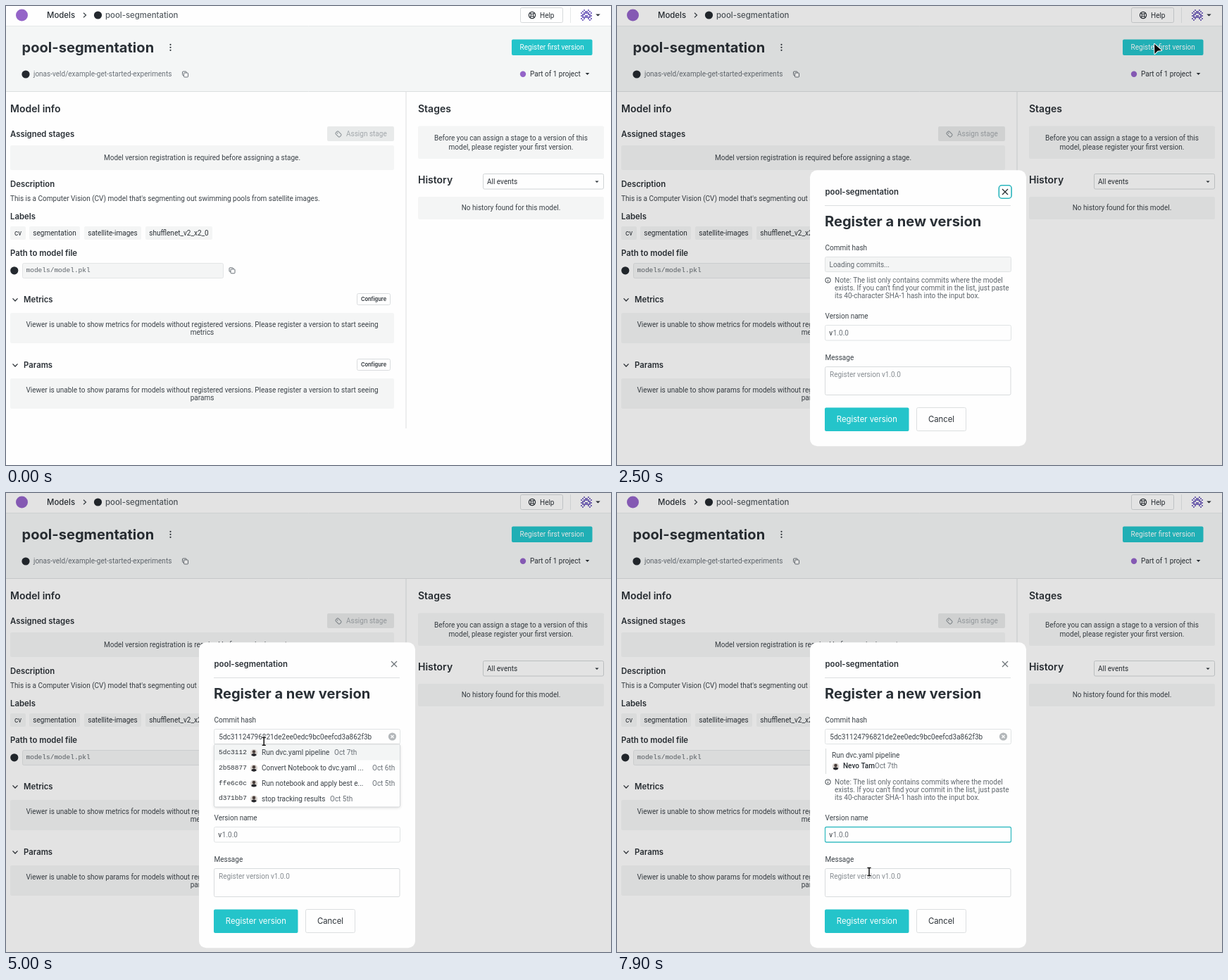
Write an HTML page with a canvas that moves like this. It is 859 px wide and 652 px high and loops after 8000 ms.

```html
<!DOCTYPE html>
<html lang="en">
<head>
<meta charset="utf-8">
<title>Register a model version</title>
<style>
  html, body { margin: 0; width: 100%; height: 100%; overflow: hidden; background: #fefefe; }
  canvas { display: block; width: 859px; height: 652px; }
</style>
</head>
<body>
<canvas id="stage"></canvas>
<script>
const W = 859, H = 652, LOOP = 8000, STEP = 100;
const canvas = document.getElementById('stage');
const ctx = canvas.getContext('2d');
const ratio = window.devicePixelRatio || 1;
canvas.width = W * ratio;
canvas.height = H * ratio;

const INK = '#2a3036', BODY = '#3b4248', MUTED = '#697077', PALE = '#858b90';
const LINE = '#dcdfe0', BOX = '#f4f5f5', TEAL = '#24c4ca', PAPER = '#fefefe';
const body = '10px Roboto, sans-serif';
const bodyMedium = '500 10px Roboto, sans-serif';
const mono = '9.5px "Liberation Mono", monospace';
const inter = (weight, size) => `${weight} ${size}px Inter, sans-serif`;
const label = inter(600, 11.35);
const section = inter(600, 14);
const title = inter(700, 20.1);

// When things happen, in ms
const HOVER = 1600, PRESS = 2300, OPEN = 2500, LOADED = 2900;
const LIST_OPEN = 4700, LIST_CLOSE = 6100, NAME_FOCUS = 7000;

// Pointer stops: time, x, y
const route = [
  [700, 668, 404], [1400, 763, 76], [1700, 763, 54], [2900, 763, 54],
  [4000, 346, 348], [4800, 346, 348], [5400, 424, 366], [6100, 424, 366],
  [6900, 345, 485], [7600, 345, 485], [7900, 358, 538]
];

function text(str, x, y, font = body, color = BODY, align = 'left') {
  ctx.font = font;
  ctx.fillStyle = color;
  ctx.textAlign = align;
  ctx.fillText(str, x, y);
}

function box(x, y, w, h, fill, stroke, radius = 2, width = 1) {
  ctx.beginPath();
  ctx.roundRect(x, y, w, h, radius);
  if (fill) { ctx.fillStyle = fill; ctx.fill(); }
  if (stroke) { ctx.strokeStyle = stroke; ctx.lineWidth = width; ctx.stroke(); }
}

function dot(x, y, r, color) {
  ctx.beginPath();
  ctx.arc(x, y, r, 0, Math.PI * 2);
  ctx.fillStyle = color;
  ctx.fill();
}

function ring(x, y, r, color, width = 1) {
  ctx.beginPath();
  ctx.arc(x, y, r, 0, Math.PI * 2);
  ctx.strokeStyle = color;
  ctx.lineWidth = width;
  ctx.stroke();
}

function lines(points, color, width = 1) {
  ctx.beginPath();
  points.forEach(([x, y], i) => i ? ctx.lineTo(x, y) : ctx.moveTo(x, y));
  ctx.strokeStyle = color;
  ctx.lineWidth = width;
  ctx.stroke();
}

function cross(x, y, r, color, width) {
  lines([[x - r, y - r], [x + r, y + r]], color, width);
  lines([[x + r, y - r], [x - r, y + r]], color, width);
}

function caret(x, y, r = 3) {
  ctx.beginPath();
  ctx.moveTo(x - r, y - r / 2);
  ctx.lineTo(x + r, y - r / 2);
  ctx.lineTo(x, y + r / 2);
  ctx.fillStyle = INK;
  ctx.fill();
}

function copyIcon(x, y) {
  box(x - 4, y - 4, 5.6, 5.6, null, MUTED, 1);
  box(x - 2, y - 2, 6, 6, PAPER, MUTED, 1);
}

function avatar(x, y) {
  ctx.save();
  ctx.beginPath();
  ctx.arc(x, y, 5, 0, Math.PI * 2);
  ctx.clip();
  ctx.fillStyle = '#d8d2ce';
  ctx.fillRect(x - 5, y - 5, 10, 10);
  dot(x, y - 1.5, 2.3, '#4a3f3b');
  dot(x, y + 5, 4, '#25262b');
  ctx.restore();
}

function userBadge(x, y) {
  const rows = [2, 5, 11, 6, 13, 7, 10, 4];
  ctx.fillStyle = '#8272c4';
  rows.forEach((bits, row) => {
    for (let col = 0; col < 4; col++) {
      if (!(bits >> (3 - col) & 1)) continue;
      ctx.fillRect(x - 8 + col * 2, y - 8 + row * 2, 2, 2);
      ctx.fillRect(x + 6 - col * 2, y - 8 + row * 2, 2, 2);
    }
  });
}

function topBar() {
  dot(22.5, 13, 8.5, '#9464c8');
  text('Models', 58, 17, inter(500, 11.4), INK);
  lines([[110, 9.8], [113.5, 13], [110, 16.2]], BODY, 1.2);
  dot(130.5, 13, 5.6, '#24292f');
  text('pool-segmentation', 141, 17, inter(500, 11.4), '#565d63');

  box(730.5, 2.5, 60, 21, PAPER, '#d6d9db');
  ring(747, 13, 4.6, INK, 1.2);
  ring(747, 13, 1.9, INK);
  for (const [sx, sy] of [[1, 1], [1, -1], [-1, 1], [-1, -1]])
    lines([[747 + sx * 1.5, 13 + sy * 1.5], [747 + sx * 3.2, 13 + sy * 3.2]], INK, 1.6);
  text('Help', 758, 16.7, body, INK);
  lines([[801.5, 2], [801.5, 24]], '#e5e7e8');
  userBadge(824, 13);
  caret(840.5, 13, 3.2);
}

function header(t) {
  ctx.fillStyle = '#f4f6f6';
  ctx.fillRect(0, 28, W, 94);
  lines([[0, 28.5], [W, 28.5]], '#e6e8e9');
  lines([[0, 121.5], [W, 121.5]], LINE);
  text('pool-segmentation', 22.5, 66, title, INK);
  for (let i = -1; i <= 1; i++) dot(233.5, 58.8 + i * 4, 1.1, INK);

  const pressed = t >= PRESS && t < OPEN;
  const hover = t >= HOVER && t < OPEN;
  if (pressed) box(716.2, 45.7, 117.8, 26, PAPER, '#23b3bb', 4, 1.5);
  box(718, 47.5, 114.5, 22.5, hover ? '#1fa9b2' : TEAL);
  text('Register first version', 775.2, 62.3, body, '#fff', 'center');

  dot(28, 97, 5.6, '#24292f');
  text('jonas-veld/example-get-started-experiments', 39, 100, body, MUTED);
  copyIcon(254.5, 97);
  dot(734, 96.7, 4.2, '#9464c8');
  text('Part of 1 project', 744, 100, body, INK);
  caret(825.5, 96.5, 2.8);
}

function notice(x, y, w, h, rows, baseline, gap) {
  box(x, y, w, h, BOX);
  rows.forEach((row, i) => text(row, x + w / 2, baseline + i * gap, body, BODY, 'center'));
}

function foldout(name, y) {
  lines([[9.5, y - 1.6], [13, y + 2], [16.5, y - 1.6]], INK, 1.3);
  text(name, 25, y + 3.7, label, INK);
  box(498.5, y - 8.5, 47, 16, PAPER, '#d9dcde');
  text('Configure', 522, y + 2.3, inter(600, 7.5), INK, 'center');
  const word = name.toLowerCase();
  notice(6, y + 19, 545, 43, [
    `Viewer is unable to show ${word} for models without registered versions. Please register a version to start seeing`,
    word
  ], y + 38.5, 11);
}

function modelInfo() {
  text('Model info', 6, 150.6, section, INK);
  text('Assigned stages', 6, 186, label, INK);
  box(456, 171, 95, 21, '#e8eaea');
  ctx.save();
  ctx.translate(472, 182);
  ctx.rotate(-Math.PI / 4);
  box(-2.6, -4, 5.2, 8, null, '#8f959a', 1.5, 1.1);
  dot(0, -2, 0.8, '#8f959a');
  ctx.restore();
  text('Assign stage', 483, 185.3, body, '#a2a7ab');
  notice(6, 198, 545, 35, ['Model version registration is required before assigning a stage.'], 219.3, 0);

  text('Description', 6, 257, label, INK);
  text("This is a Computer Vision (CV) model that's segmenting out swimming pools from satellite images.", 6, 276.6);

  text('Labels', 6, 303.3, label, INK);
  const chips = [['cv', 6, 22], ['segmentation', 33, 72], ['satellite-images', 111, 81], ['shufflenet_v2_x2_0', 198, 95]];
  for (const [name, x, w] of chips) {
    box(x, 313, w, 19, BOX);
    text(name, x + w / 2, 325.8, body, INK, 'center');
  }

  text('Path to model file', 6, 355.2, label, INK);
  dot(11.8, 375.8, 5.6, '#24292f');
  box(23.5, 365.5, 285, 21, BOX, '#e3e5e6');
  text('models/model.pkl', 28.5, 378, mono, '#5b6268');
  copyIcon(321, 375.8);

  foldout('Metrics', 417);
  foldout('Params', 510);
}

function sidebar() {
  lines([[568, 122], [568, 600]], LINE);
  text('Stages', 585, 150.6, section, INK);
  notice(585, 170.5, 264, 46.5, [
    'Before you can assign a stage to a version of this',
    'model, please register your first version.'
  ], 191.3, 12.3);
  text('History', 585, 251.8, section, INK);
  box(677.5, 238.5, 171, 21.5, PAPER, '#d0d4d6');
  text('All events', 683, 253, body, INK);
  caret(839, 249.7, 2.6);
  notice(585, 271, 264, 32, ['No history found for this model.'], 290.3, 0);
}

function commitList() {
  ctx.save();
  ctx.shadowColor = 'rgba(0,0,0,.16)';
  ctx.shadowBlur = 4;
  ctx.shadowOffsetY = 1;
  box(295.5, 357, 264, 89, PAPER);
  ctx.restore();
  box(295.5, 357, 264, 89, PAPER, '#d6d9db');
  ctx.fillStyle = '#f3f5f5';
  ctx.fillRect(296, 358, 263, 21.5);
  const rows = [
    ['5dc3112', 'Run dvc.yaml pipeline', 'Oct 7th', 466],
    ['2b58877', 'Convert Notebook to dvc.yaml ...', 'Oct 6th', 520],
    ['ffe6c0c', 'Run notebook and apply best e...', 'Oct 5th', 520],
    ['d371bb7', 'stop tracking results', 'Oct 5th', 460]
  ];
  rows.forEach(([hash, message, date, x], i) => {
    const y = 368.6 + i * 21.8;
    text(hash, 302, y + 2.4, mono, INK);
    avatar(352, y + 0.4);
    text(message, 363, y + 3.5);
    text(date, x, y + 3.5, body, MUTED);
  });
}

function commitCard() {
  lines([[296.5, 363], [296.5, 399]], LINE, 1.2);
  text('Run dvc.yaml pipeline', 305, 376.3);
  avatar(310.5, 388.5);
  text('Nevo Tam', 321, 391.3, bodyMedium, INK);
  text('Oct 7th', 366, 391.3, body, MUTED);
}

function modalTop(t, loaded) {
  text('pool-segmentation', 295.5, 247.2, label, INK);
  const focused = t < LIST_OPEN;
  if (focused) box(542.3, 233.8, 17.8, 18.4, PAPER, '#2bb5bd', 4, 1.6);
  cross(551, 243, 4, focused ? INK : '#70767b', 1.3);
  lines([[295, 262.5], [559, 262.5]], LINE);
  text('Register a new version', 295, 292, title, INK);
  text('Commit hash', 295.5, 325.6);
  box(295.5, 335.5, 264, 21, loaded ? PAPER : BOX, '#e0e3e4');
  if (!loaded) {
    text('Loading commits...', 301.5, 349.8, body, '#60676d');
    return;
  }
  text('5dc31124796821de2ee0edc9bc0eefcd3a862f3b', 302.3, 349.6);
  dot(548.5, 346, 5.6, '#b3b7ba');
  cross(548.5, 346, 2, '#fff', 1.2);
}

function modalBottom(t) {
  ring(299.5, 410.5, 3.7, BODY);
  lines([[299.5, 410], [299.5, 412.6]], BODY);
  dot(299.5, 408.5, 0.6, BODY);
  ['Note: The list only contains commits where the model',
    "exists. If you can't find your commit in the list, just paste",
    'its 40-character SHA-1 hash into the input box.'
  ].forEach((row, i) => text(row, 309, 413.8 + i * 11, body, '#5f666c'));

  text('Version name', 295.5, 465);
  box(295.5, 474.5, 264, 21.5, PAPER, t >= NAME_FOCUS ? '#3bbdc3' : '#e0e3e4', 2, t >= NAME_FOCUS ? 1.3 : 1);
  text('v', 301.2, 489, body, INK);
  text('1.0.0', 306.8, 489, body, MUTED);

  text('Message', 295.5, 523.7);
  box(295.5, 533.5, 263.5, 40, PAPER, '#d8dbdd');
  text('Register version v1.0.0', 302, 548.4, body, PALE);

  const buttonFont = inter(400, 11.3);
  box(295, 591.5, 119.5, 33.5, TEAL);
  text('Register version', 354.8, 612.4, buttonFont, '#fff', 'center');
  box(425.5, 591.5, 70, 33, PAPER, '#dcdfe0');
  text('Cancel', 460.5, 612.4, buttonFont, INK, 'center');
}

function modal(t) {
  const loaded = t >= LOADED;
  const shift = loaded ? 0 : 21;
  ctx.fillStyle = 'rgba(0,6,4,.105)';
  ctx.fillRect(0, 0, W, H);
  box(274, 212.3 + shift, 307, 434 - 2 * shift, PAPER, null, 10);

  ctx.save();
  ctx.translate(0, shift);
  modalTop(t, loaded);
  ctx.restore();

  ctx.save();
  ctx.translate(0, -shift);
  modalBottom(t);
  ctx.restore();

  if (loaded) commitCard();
  if (listOpen(t)) commitList();
}

const listOpen = t => t >= LIST_OPEN && t < LIST_CLOSE;

function pointerAt(t) {
  if (t < route[0][0]) return null;
  const next = route.findIndex(stop => stop[0] > t);
  if (next < 0) return route[route.length - 1].slice(1);
  const [t0, x0, y0] = route[next - 1], [t1, x1, y1] = route[next];
  const u = (t - t0) / (t1 - t0), e = u * u * (3 - 2 * u);
  return [x0 + (x1 - x0) * e, y0 + (y1 - y0) * e];
}

function pointerShape(t, x, y) {
  if (t < LOADED || x < 295 || x > 559) return 'arrow';
  if (listOpen(t) && y > 357 && y < 446) return 'hand';
  const inField = [[335, 357], [474, 496], [533, 574]].some(([a, b]) => y > a && y < b);
  return inField ? 'beam' : 'arrow';
}

const outlines = {
  arrow: new Path2D('M0 0 L10.2 9 L4.6 9.8 L0.4 14 Z'),
  hand: new Path2D('M-1.3 1 Q0 -1 1.3 1 V4.6 L6 5.6 Q7.4 6 7.2 7.6 L6.2 12.5 H0.4 L-3.4 8 Q-3.4 6.2 -1.3 7.4 Z'),
  beam: new Path2D('M-2.6 -5.5 H2.6 M-2.6 5.5 H2.6 M0 -5.5 V5.5')
};

function pointer(t) {
  const at = pointerAt(t);
  if (!at) return;
  const shape = pointerShape(t, ...at), path = outlines[shape];
  ctx.save();
  ctx.translate(...at);
  ctx.lineJoin = 'round';
  ctx.strokeStyle = '#fff';
  ctx.lineWidth = shape === 'beam' ? 3.2 : 2;
  ctx.stroke(path);
  if (shape === 'beam') {
    ctx.strokeStyle = '#111';
    ctx.lineWidth = 1.5;
    ctx.stroke(path);
  } else {
    ctx.fillStyle = '#0b0b0b';
    ctx.fill(path);
  }
  ctx.restore();
}

function draw(t) {
  ctx.setTransform(ratio, 0, 0, ratio, 0, 0);
  ctx.fillStyle = PAPER;
  ctx.fillRect(0, 0, W, H);
  topBar();
  header(t);
  modelInfo();
  sidebar();
  if (t >= OPEN) modal(t);
  pointer(t);
}

const start = performance.now();
function tick() {
  const t = (performance.now() - start) % LOOP;
  draw(Math.floor(t / STEP) * STEP);
  requestAnimationFrame(tick);
}
tick();
</script>
</body>
</html>
```
